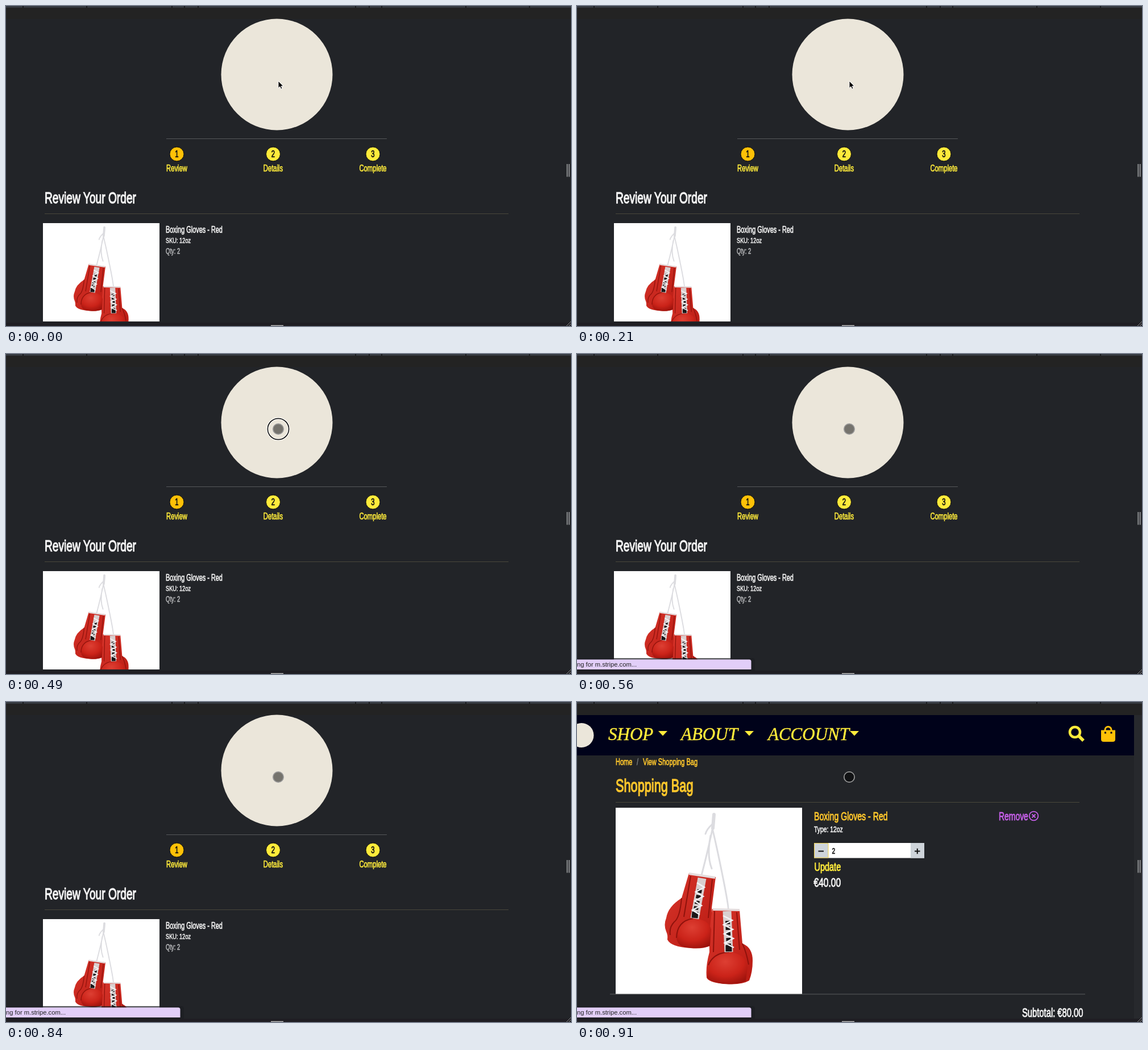
Write an HTML page that moves like this. It is 994 by 563 pixels and loops after 1.47 s.

```html
<!DOCTYPE html>
<html lang="en">
<head>
<meta charset="utf-8">
<title>Order review and shopping bag</title>
<style>
html, body { margin: 0; width: 100%; height: 100%; overflow: hidden; background: #222428; }
svg { display: block; width: 994px; height: 563px; }
.label { font-family: "Liberation Sans", Arial, sans-serif; stroke: currentColor; stroke-width: .045em; fill: currentColor; }
.menu { font: italic 31px "Liberation Serif", "Times New Roman", serif; fill: #ffeb3b; stroke: #ffeb3b; stroke-width: .5; }
.status { font: 11.2px "Liberation Sans", Arial, sans-serif; fill: #222; }
</style>
</head>
<body>
<svg viewBox="0 0 994 563">
  <defs>
    <linearGradient id="leather" x1="0" y1="0" x2="1" y2="1">
      <stop offset="0" stop-color="#d8352b"/>
      <stop offset="1" stop-color="#b81a12"/>
    </linearGradient>
    <radialGradient id="fist" cx=".45" cy=".3" r=".75">
      <stop offset="0" stop-color="#dd3f33"/>
      <stop offset=".6" stop-color="#cb2319"/>
      <stop offset="1" stop-color="#9c120c"/>
    </radialGradient>
    <symbol id="gloves" viewBox="68 186 328 328">
      <path fill="#fff" d="M68 186h328v328H68z"/>
      <g fill="none" stroke="#dcdce0" stroke-linecap="round">
        <path stroke-width="6" d="M241 198L239 222"/>
        <path stroke-width="3" d="M240 215Q232 255 219 305M238 215Q228 224 226 232M238 222Q246 255 257 310T266 368M235 235Q228 270 237 293"/>
      </g>
      <g fill="url(#leather)">
        <path d="M197 301L244 308 237 362 238 385Q240 400 234 429 220 435 200 433 165 431 159 418 160 410 157 404 152 392 157 380 160 360 184 345Z"/>
        <path d="M238 364L286 366 291 425Q309 432 309 455 309 475 303 490 290 498 262 496 232 494 228 485 226 465 233 440 232 400 238 364Z"/>
      </g>
      <g fill="url(#fist)">
        <path d="M175 415Q174 382 204 381 232 382 236 400L234 429Q218 435 193 432 177 430 175 415Z"/>
        <path d="M231 463Q240 440 268 440 298 443 300 467L297 491Q280 498 258 496 235 493 229 485Z"/>
      </g>
      <path fill="none" stroke="#8f120c" stroke-width="2" d="M184 345Q181 380 171 387 162 396 164 410M238 312L231 380M200 306L188 378M175 415Q176 385 204 381M291 425Q298 440 302 462M242 368L240 440M281 370L286 436M231 463Q240 441 268 440"/>
      <path fill="none" stroke="#e4dcdd" stroke-width="4" d="M197 302L243 309M239 365L286 366"/>
      <g fill="none">
        <path stroke="#d9cfcf" stroke-width="15" d="M220 310L207 381M264 368L267 440"/>
        <path stroke="#1b1718" stroke-width="8" stroke-dasharray="6 4" d="M216 330L208 370M265 385L267 430"/>
        <path stroke="#1b1718" stroke-width="11" d="M208 369L207 380M267 428L267 439"/>
        <path stroke="#f3f3f5" stroke-width="2.500" d="M211 318L224 326 209 334 222 342 207 350 219 358 203 366 216 374M257 376L273 384 258 392 274 400 259 408 275 416 260 424 276 432"/>
      </g>
    </symbol>
  </defs>

  <path fill="#222428" d="M0 0h994v563H0z"/>
  <path fill="#232323" d="M0 0h994v23H0z"/>
  <path fill="#373b42" d="M0 0h994v3H0z"/>
  <path id="ticks" stroke="#191b1e" stroke-width="2"/>
  <g id="review"></g>
  <g id="bag"></g>
  <g id="status">
    <path fill="#1c1d21" d="M0 535h308q5 0 5 5v17H0z" opacity=".7"/>
    <path fill="#e2cef8" d="M0 537.500h303q3.500 0 3.500 3.500v14H0z"/>
    <text class="status" y="550">ng for m.stripe.com...</text>
  </g>
  <path fill="#1d1c20" d="M0 557h994v6H0z" opacity=".6"/>
  <path fill="#b5b5b5" d="M466 561.500h22v1.500h-22z"/>
  <path stroke="#96989a" stroke-width="1.800" d="M987.300 278v22.500M990.700 278v22.500"/>
  <path stroke="#8b8c8e" d="M986 563l8-8M990 563l4-4"/>

  <g transform="translate(479 132)">
    <path id="arrow" fill="#000" stroke="#fff" d="M0 0V12.500L2.900 9.800 4.900 14.200 7.100 13.200 5.100 9H9Z"/>
    <circle id="dot" r="9.200" fill="#000" fill-opacity=".5" stroke="#999" stroke-width="1.700"/>
    <g id="ring" fill="none">
      <circle stroke="#fff" stroke-width="3.500"/>
      <circle stroke="#000" stroke-width="1.500"/>
    </g>
  </g>
</svg>
<script>
const $ = id => document.getElementById(id);
const AMBER = '#ffc72c', YELLOW = '#ffeb3b', WHITE = '#f4f4f4', PURPLE = '#c45fe6';

// Condensed lettering: one narrowing factor for the whole typeface
const label = (x, y, size, str, color, anchor = 'start') =>
  `<text class="label" transform="translate(${x} ${y}) scale(.69 1)" font-size="${size}"
    color="${color}" text-anchor="${anchor}">${str}</text>`;
const rule = (x1, x2, y, color) => `<path stroke="${color}" d="M${x1} ${y}H${x2}"/>`;
const badge = (x, y, r) => `<circle cx="${x}" cy="${y}" r="${r}" fill="#ebe6da"/>`;
const step = (x, n, name, color) =>
  `<circle cx="${x}" cy="260.5" r="12.500" fill="${color}" stroke="#0b0b0c"/>` +
  label(x, 265.5, 16.4, n, '#111', 'middle') + label(x, 290.5, 16.3, name, YELLOW, 'middle');
const menu = (x, name, caret) =>
  `<text class="menu" x="${x}" y="67">${name}</text>
   <path fill="${YELLOW}" d="M${caret} 51h16l-8 8.500z"/>`;

$('ticks').setAttribute('d',
  [30, 142, 292, 314, 338, 615, 639, 661, 809, 921].map(x => `M${x} 0v3`).join(''));

$('review').innerHTML =
  badge(476.5, 120.5, 98) +
  rule(282, 670, 233.5, '#55575a') +
  step(300.5, 1, 'Review', '#ffc107') +
  step(470, 2, 'Details', YELLOW) +
  step(645.5, 3, 'Complete', YELLOW) +
  label(68, 347, 27.8, 'Review Your Order', WHITE) +
  rule(68, 884, 365.5, '#4a483b') +
  `<svg x="65" y="382" width="205" height="173">
     <use href="#gloves" width="205" height="205"/></svg>` +
  label(281, 398.5, 15.8, 'Boxing Gloves - Red', WHITE) +
  label(281, 417, 13.4, 'SKU: 12oz', WHITE) +
  label(281, 435.5, 13.8, 'Qty: 2', '#b4b5b7');

$('bag').innerHTML =
  `<path fill="#00021a" d="M0 23h980v71H0z"/><path fill="#27292d" d="M980 23h14v534h-14z"/>` +
  badge(8, 58.5, 21.5) +
  menu(55, 'SHOP', 143) + menu(183, 'ABOUT', 295) + menu(336, 'ACCOUNT', 480) +
  `<g fill="none" stroke="${YELLOW}" stroke-width="4.500">
     <circle cx="876" cy="53" r="9"/><path d="M882 59l9 9" stroke-width="5.500"/></g>
   <path fill="#ffc107" d="M922 49.500h25v16q0 4.500-4.500 4.500h-16q-4.500 0-4.500-4.500z"/>
   <path fill="none" stroke="#ffc107" stroke-width="3" d="M929 51v-2a5.500 5.500 0 0 1 11 0v2"/>
   <path fill="#00021a" d="M928 52.500h3v3h-3zM938.500 52.500h3v3h-3z"/>` +
  label(68, 110.5, 15.9, 'Home', AMBER) +
  label(105, 110.5, 15.9, '/', '#7a7d80') +
  label(116, 110.5, 16, 'View Shopping Bag', AMBER) +
  label(68, 157.5, 31.5, 'Shopping Bag', AMBER) +
  rule(68, 884, 176.5, '#4a483b') +
  '<use href="#gloves" x="68" y="186" width="328" height="328"/>' +
  label(417, 207.5, 20.5, 'Boxing Gloves - Red', AMBER) +
  label(417, 229, 15, 'Type: 12oz', WHITE) +
  `<path fill="#fff" d="M417 248h194v26.500H417z"/>
   <path fill="#ced4da" d="M587 248h24v26.500h-24z"/>
   <path fill="#ced4da" stroke="#f2d44c" d="M417.500 248.500h24.500v25.500h-24.500z"/>
   <path stroke="#111" stroke-width="2" d="M424.500 262.500h9.500M594 262.500h9.500M598.750 257.750v9.500"/>` +
  label(448.5, 267, 15, '2', '#111') +
  label(417.5, 297, 21, 'Update', YELLOW) +
  label(416.5, 325, 22.6, '€40.00', WHITE) +
  label(742, 207.5, 20.2, 'Remove', PURPLE) +
  `<g fill="none" stroke="${PURPLE}" stroke-width="1.800">
     <circle cx="803.500" cy="200.500" r="7.800"/><path d="M800.500 197.500l6 6m0-6l-6 6"/></g>` +
  rule(58, 894, 514, '#5a5c5f') +
  label(783, 553.5, 21.4, 'Subtotal: €80.00', WHITE);

const show = (id, on) => $(id).setAttribute('visibility', on ? 'visible' : 'hidden');
const rings = document.querySelectorAll('#ring circle');

function draw(now) {
  const t = now % 1470;
  const pressed = t >= 350, loading = t >= 560, arrived = t >= 910;
  show('review', !arrived);
  show('bag', arrived);
  show('status', loading);
  show('arrow', !pressed);
  show('dot', pressed);
  show('ring', pressed && !loading);
  if (pressed && !loading) {
    const r = 10 + 4.3 * Math.floor((t - 350) / 70);
    rings.forEach(c => c.setAttribute('r', r));
  }
}

const start = performance.now();
function tick() {
  draw(performance.now() - start);
  requestAnimationFrame(tick);
}
tick();
</script>
</body>
</html>
```
